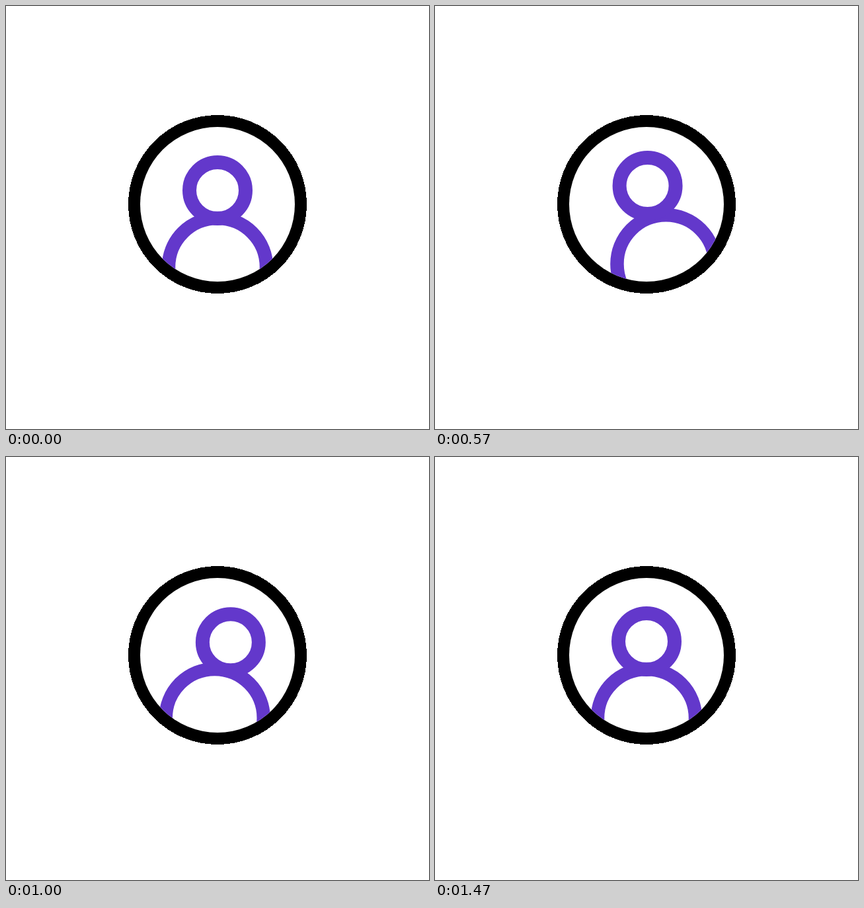
An HTML page that plays this animation: 640x640 px, repeating every 1.67 s.

```html
<!DOCTYPE html>
<html lang="en">
<head>
<meta charset="utf-8">
<title>Profile icon</title>
<style>
  html, body { margin: 0; width: 100%; height: 100%; overflow: hidden; background: #fff; }
  svg { display: block; width: 100%; height: 100%; }
</style>
</head>
<body>
<svg viewBox="0 0 640 640">
  <clipPath id="window"><circle cx="320" cy="300" r="117"/></clipPath>
  <circle cx="320" cy="300" r="135" shape-rendering="crispEdges"/>
  <circle cx="320" cy="300" r="117" fill="#fff"/>
  <g clip-path="url(#window)" fill="none" stroke="#6338cb">
    <circle id="body" r="74" stroke-width="20.5"/>
    <circle id="head" r="42.5" stroke-width="21"/>
  </g>
</svg>
<script>
  const LOOP = 1670, FPS = 30;

  // [step, offset] keys, eased in and out between neighbours
  const headX = [[0, 0], [11, -42], [22.8, 43], [36.5, 0]];
  const headY = [[0, 0], [4, -1.5], [11, 6.5], [17, -7], [23.5, 6], [34, -1], [44, 0]];
  const bodyX = [[0.5, 0], [12, 33.5], [15.5, 33], [25, -20], [34, 7], [44, 0]];

  function valueAt(keys, step) {
    const next = keys.findIndex(([k]) => k > step);
    if (next < 0) return keys[keys.length - 1][1];
    if (next === 0) return keys[0][1];
    const [k0, v0] = keys[next - 1], [k1, v1] = keys[next];
    const s = (step - k0) / (k1 - k0);
    return v0 + (v1 - v0) * s * s * (3 - 2 * s);
  }

  function place(id, x, y) {
    const circle = document.getElementById(id);
    circle.setAttribute("cx", x);
    circle.setAttribute("cy", y);
  }

  function draw() {
    const time = performance.now() % LOOP;
    const step = Math.floor((time + 5) * FPS / 1000);
    const sway = valueAt(bodyX, step);
    place("head", 320 + valueAt(headX, step), 279 + valueAt(headY, step));
    place("body", 320 + sway, 395 - 0.0055 * sway * sway);
    requestAnimationFrame(draw);
  }
  draw();
</script>
</body>
</html>
```
